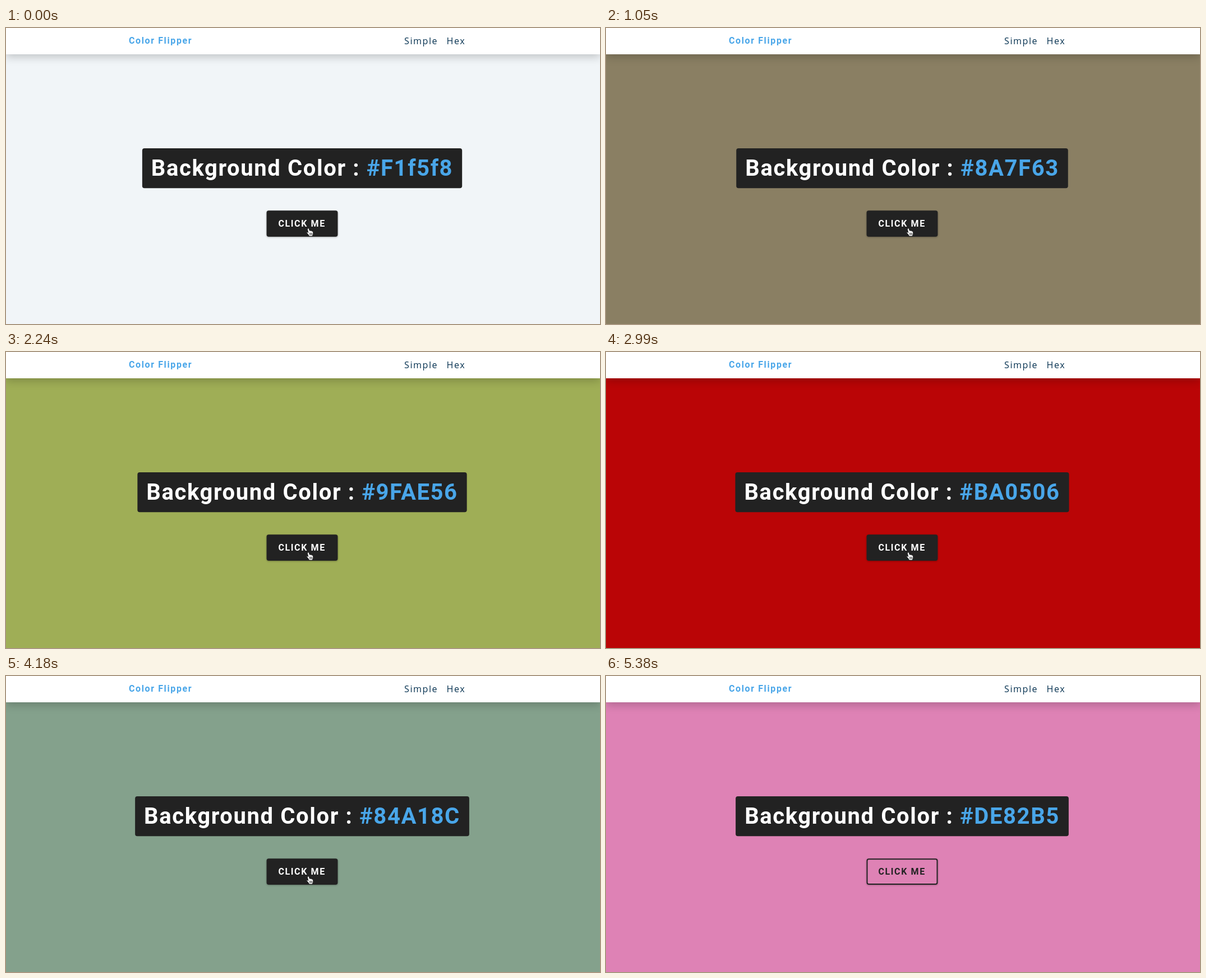
Animation, 1059 px wide and 529 px high, one loop 6.13 s. Source, as an HTML page:

```html
<!DOCTYPE html>
<html lang="en">
<head>
<meta charset="utf-8">
<title>Color flipper</title>
<style>
  html, body { margin: 0; width: 100%; height: 100%; overflow: hidden; }
  svg { display: block; width: 1059px; height: 529px; }
  text { letter-spacing: 1.6px; white-space: pre; }
  .bold { font: 700 16px Roboto, sans-serif; }
  .link { font: 400 16px "Open Sans", sans-serif; fill: #063251; }
  #title { font-size: 40px; fill: #fff; }
  #nav { filter: drop-shadow(0 5px 7.5px rgba(0, 0, 0, .2)); }
  #shadow { filter: blur(1.5px); }
</style>
</head>
<body>
<svg viewBox="0 0 1059 529">
  <defs>
    <mask id="outside">
      <rect width="1059" height="529" fill="#fff"/>
      <rect x="464.5" y="326.3" width="127" height="46.7" rx="4" fill="#000"/>
    </mask>
  </defs>
  <rect id="page" width="1059" height="529"/>
  <rect id="nav" width="1059" height="47" fill="#fff"/>
  <text class="bold" x="219" y="28" fill="#49a6e9">Color Flipper</text>
  <text class="link" x="710" y="29">Simple</text>
  <text class="link" x="785.5" y="29">Hex</text>

  <rect id="panel" y="215" height="71.3" rx="4" fill="#222"/>
  <text id="title" class="bold" y="264">Background Color : <tspan id="code" fill="#49a6e9"></tspan></text>

  <g mask="url(#outside)">
    <rect id="shadow" x="464.5" y="327.3" width="127" height="46.7" rx="4" opacity=".3"/>
  </g>
  <rect id="button" x="465.5" y="327.3" width="125" height="44.7" rx="3" fill="#222" stroke="#222" stroke-width="2"/>
  <text id="label" class="bold" x="485.5" y="355">CLICK ME</text>

  <g id="hand" transform="translate(535 357)" stroke-linejoin="round" stroke-linecap="round">
    <path d="M3 1.2Q4.4 .2 5.2 1.8L6.3 5.2Q7.6 4.4 8.3 5.6Q9.8 4.8 10.5 6.2Q12.4 5.8 12.6 8V10.5L11.3 15H5.5L4.2 12.4L1 9Q.6 7.4 2.2 7.7L3.8 8.9L2.4 2.6Q2.2 1.6 3 1.2Z" fill="#fff" stroke="#111" stroke-width=".8"/>
    <path d="M6.6 9.4V12.6M8.5 9.4V12.6M10.3 9.4V12.6" fill="none" stroke="#111" stroke-width=".8"/>
  </g>
  <path id="arrow" transform="translate(645 513)" d="M0 0V14.5L3.4 11.4L5.6 16.5L8 15.4L5.8 10.5H10.5Z" fill="#000" stroke="#fff"/>
</svg>
<script>
const LOOP = 6130, CENTER = 528, PADDING = 16;
const colors = [
  [0, '#F1f5f8'], [450, '#25E727'], [1050, '#8A7F63'], [1490, '#435276'],
  [2240, '#9FAE56'], [2990, '#BA0506'], [3590, '#6F8C9A'], [4180, '#84A18C'], [4780, '#DE82B5']
];
// How far the button has faded from filled to outlined.
const fades = [[0, 0], [5080, .03], [5230, .5], [5380, 1]];

const $ = id => document.getElementById(id);
const set = (id, attrs) => {
  for (const name in attrs) $(id).setAttribute(name, attrs[name]);
};
const valueAt = (steps, t) => steps.filter(([start]) => start <= t).pop()[1];
const show = (id, visible) => set(id, { visibility: visible ? 'visible' : 'hidden' });

function render(t) {
  const color = valueAt(colors, t);
  const fade = valueAt(fades, t);
  set('page', { fill: color });

  if ($('code').textContent !== color) $('code').textContent = color;
  const width = $('title').getComputedTextLength();
  set('title', { x: CENTER - width / 2 });
  set('panel', { x: CENTER - width / 2 - PADDING, width: width + 2 * PADDING });

  const shade = Math.round(255 + (34 - 255) * fade);
  set('button', { 'fill-opacity': 1 - fade });
  set('label', { fill: `rgb(${shade},${shade},${shade})` });
  show('hand', t < 5080);
  show('arrow', t >= 5080 && t < 5230);
}

const start = performance.now();
function tick() {
  render((performance.now() - start) % LOOP);
  requestAnimationFrame(tick);
}
tick();
</script>
</body>
</html>
```
